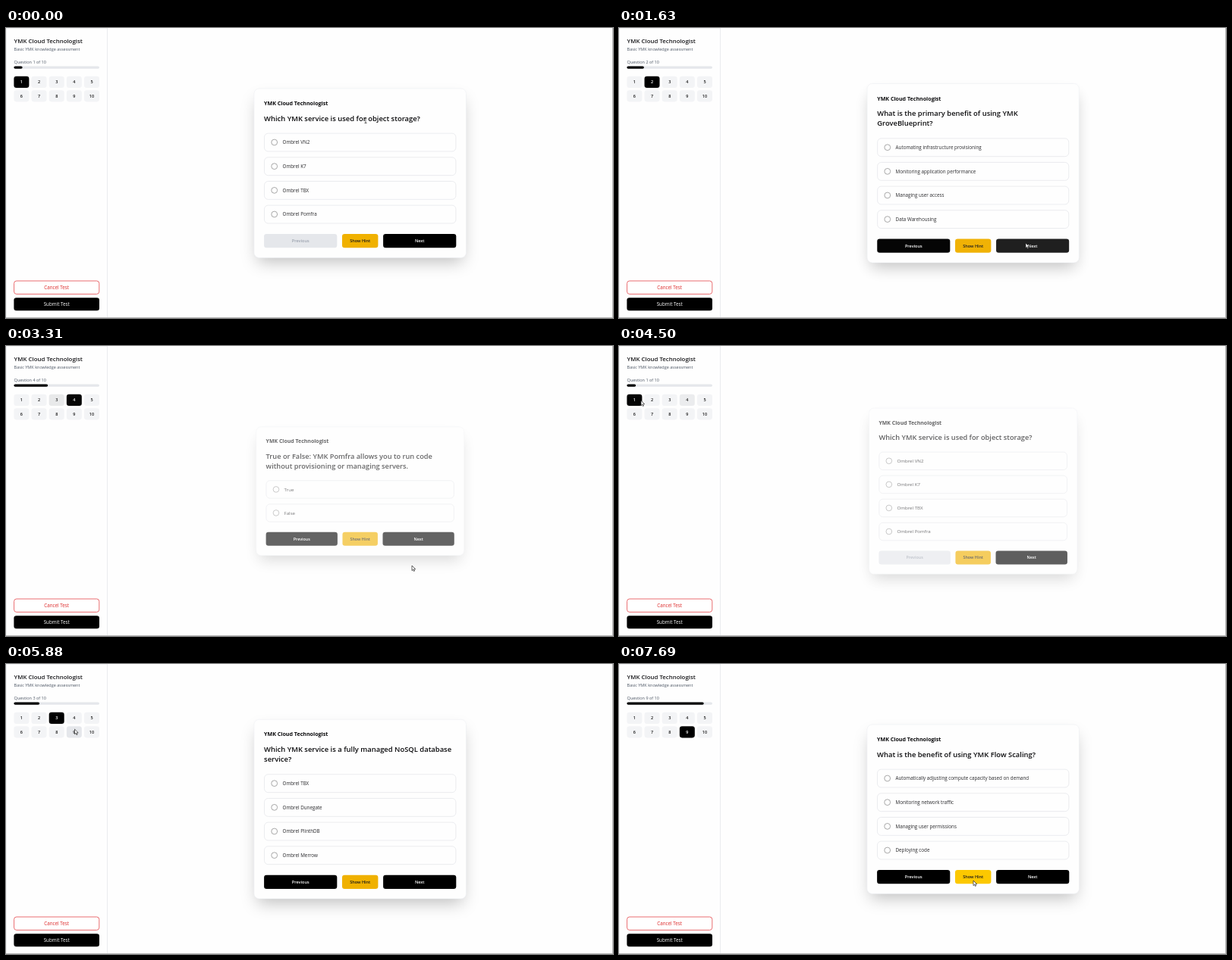
An HTML page with a canvas for the animation above (8 s loop, 800 by 383 pixels).

```html
<!DOCTYPE html>
<html lang="en">
<head>
<meta charset="utf-8">
<title>Practice test</title>
<style>
  html, body { margin: 0; width: 100%; height: 100%; overflow: hidden; background: #fefefe; }
  canvas { display: block; width: 800px; height: 383px; }
</style>
</head>
<body>
<canvas id="stage"></canvas>
<script>
const W = 800, H = 383, LOOP = 8000;
const FONT = '"Open Sans", "Noto Sans", sans-serif';
const NAME = 'YMK Cloud Technologist';
const CENTER = { x: 466.7, y: 191.7 };

const questions = {
  1: { title: ['Which YMK service is used for object storage?'],
       options: ['Ombrel VN2', 'Ombrel K7', 'Ombrel TBX', 'Ombrel Pomfra'] },
  2: { title: ['What is the primary benefit of using YMK', 'GroveBlueprint?'],
       options: ['Automating infrastructure provisioning', 'Monitoring application performance',
                 'Managing user access', 'Data Warehousing'] },
  3: { title: ['Which YMK service is a fully managed NoSQL database', 'service?'],
       options: ['Ombrel TBX', 'Ombrel Dunegate', 'Ombrel PlinthDB', 'Ombrel Merrow'] },
  4: { title: ['True or False: YMK Pomfra allows you to run code', 'without provisioning or managing servers.'],
       options: ['True', 'False'] },
  9: { title: ['What is the benefit of using YMK Flow Scaling?'],
       options: ['Automatically adjusting compute capacity based on demand', 'Monitoring network traffic',
                 'Managing user permissions', 'Deploying code'] },
  10: { title: ['Which of the following is a valid method for accessing', 'YMK services?'],
        options: ['YMK Operations Console', 'Command Line Interface (CLI)',
                  'Software Development Kits (SDKs)', 'All of the above'] }
};

// [time, question]
const clicks = [[-1000, 1], [1240, 2], [2400, 3], [3070, 4], [4250, 1], [4850, 2], [5178, 3], [6070, 10], [6640, 9]];

// [time, x, y]
const path = [
  [0, 474, 122], [80, 474, 122], [860, 536, 255], [1060, 536, 284], [2060, 536, 284], [2190, 535, 290],
  [3400, 535, 290], [4150, 25, 72], [4300, 25, 72], [4480, 29, 72], [4560, 29, 72], [4800, 44, 73],
  [4920, 44, 73], [5130, 63, 74], [5690, 63, 74], [6000, 104, 92], [6460, 104, 92], [6600, 92, 90],
  [6750, 92, 90], [7250, 440, 226], [7690, 467, 286]
];

const dpr = window.devicePixelRatio || 1;
const stage = document.getElementById('stage');
const layer = document.createElement('canvas');
for (const c of [stage, layer]) { c.width = W * dpr; c.height = H * dpr; }
const main = stage.getContext('2d');
const card = layer.getContext('2d');

const clamp = v => Math.max(0, Math.min(1, v));
const mix = (a, b, k) => a + (b - a) * k;
const smooth = k => k * k * (3 - 2 * k);

// cubic-bezier(.4, 0, .2, 1)
function standardEase(x) {
  let lo = 0, hi = 1, u = x;
  for (let i = 0; i < 20; i++) {
    u = (lo + hi) / 2;
    const bx = 1.2 * u * (1 - u) ** 2 + 0.6 * u * u * (1 - u) + u ** 3;
    if (bx < x) lo = u; else hi = u;
  }
  return u * u * (3 - 2 * u);
}

function cursorAt(t) {
  const i = path.findIndex(p => p[0] > t);
  if (i < 0) return { x: path.at(-1)[1], y: path.at(-1)[2] };
  const [t0, x0, y0] = path[i - 1], [t1, x1, y1] = path[i];
  const k = smooth((t - t0) / (t1 - t0));
  return { x: mix(x0, x1, k), y: mix(y0, y1, k) };
}

function stateAt(t) {
  let i = clicks.length - 1;
  while (clicks[i][0] > t) i--;
  const age = t - clicks[i][0];
  return {
    current: clicks[i][1],
    previous: clicks[Math.max(0, i - 1)][1],
    ease: standardEase(clamp(age / 300)),
    fade: clamp(age / 400),
    cursor: cursorAt(t)
  };
}

const inside = (p, x, y, w, h) => p.x >= x && p.x <= x + w && p.y >= y && p.y <= y + h;

function box(g, x, y, w, h, r, fill, stroke, line = 0.7) {
  g.beginPath();
  g.roundRect(x, y, w, h, r);
  if (fill) { g.fillStyle = fill; g.fill(); }
  if (stroke) { g.strokeStyle = stroke; g.lineWidth = line; g.stroke(); }
}

// y is the middle of the capital letters
function text(g, str, x, y, size, color, weight = 400, align = 'left') {
  g.font = `${weight} ${size}px ${FONT}`;
  g.textAlign = align;
  g.fillStyle = color;
  g.fillText(str, x, y + size * 0.36);
}

function button(g, label, x, y, w, h, fill, color, size = 5.5, weight = 600, stroke) {
  box(g, x, y, w, h, 3.3, fill, stroke, 0.8);
  text(g, label, x + w / 2, y + h / 2, size, color, weight, 'center');
}

function drawSidebar(g, s) {
  g.fillStyle = '#e5e7eb';
  g.fillRect(133, 0, 0.8, H);
  g.fillRect(0, 0, 0.5, H);
  g.fillRect(0, 0, 133, 0.5);
  text(g, NAME, 10.6, 16.7, 7.85, '#18181b', 600);
  text(g, 'Basic YMK knowledge assessment', 10.6, 28.2, 5.5, '#4b5563');
  text(g, `Question ${s.current} of 10`, 10.6, 44.7, 5.5, '#4b5563');

  const done = mix(s.previous, s.current, s.ease) / 10;
  box(g, 10.4, 50.4, 112.6, 3.4, 1.7, '#e5e7eb');
  box(g, 10.4, 50.4, 112.6 * done, 3.4, 1.7, '#000');

  for (let n = 1; n <= 10; n++) {
    const x = 10.4 + (n - 1) % 5 * 23.15, y = n > 5 ? 82.2 : 63.8;
    const idle = inside(s.cursor, x, y, 20, 15.2) ? [229, 231, 235] : [243, 244, 246];
    let dark = 0;
    if (n === s.previous) dark = 1 - s.ease ** 2;
    if (n === s.current) dark = s.previous === n ? 1 : s.ease;
    const shade = idle.map(v => Math.round(v * (1 - dark)));
    const ink = Math.round(mix(24, 255, dark));
    button(g, n, x, y, 20, 15.2, `rgb(${shade})`, `rgb(${ink},${ink},${ink})`);
  }
  button(g, 'Cancel Test', 10.6, 334, 112.2, 17.4, '#fff', '#dc2626', 6.28, 400, '#e5484d');
  button(g, 'Submit Test', 10.4, 356.2, 112.6, 17, '#000', '#fff', 6.28, 400);
}

function drawCard(g, s) {
  const q = questions[s.current];
  const extra = (q.title.length - 1) * 13.3;
  const list = 58.9 + extra, foot = list + q.options.length * 31.67 + 6.6;
  const height = foot + 31.6, x = 326.7, top = CENTER.y - height / 2, left = x + 13.4;
  const scale = 0.95 + 0.05 * s.fade;
  const point = {
    x: CENTER.x + (s.cursor.x - CENTER.x) / scale,
    y: CENTER.y + (s.cursor.y - CENTER.y) / scale
  };

  g.setTransform(dpr, 0, 0, dpr, 0, 0);
  g.clearRect(0, 0, W, H);
  g.translate(CENTER.x, CENTER.y);
  g.scale(scale, scale);
  g.translate(-CENTER.x, -CENTER.y);

  g.save();
  g.shadowColor = 'rgba(0,0,0,.25)';
  g.shadowBlur = 20.8 * dpr * scale;
  g.shadowOffsetY = 10.4 * dpr * scale;
  box(g, x + 5, top + 5, 270, height - 10, 4, '#fff');
  g.restore();
  box(g, x + 0.2, top + 0.2, 279.6, height - 0.4, 6.7, '#fefefe', '#ebedf0', 0.5);

  text(g, NAME, left, top + 19.7, 7.1, '#09090b', 700);
  q.title.forEach((line, i) => text(g, line, left, top + 39.5 + i * 13.3, 9.42, '#09090b', 600));

  q.options.forEach((label, i) => {
    const y = top + list + i * 31.67;
    const hover = inside(point, left, y, 253, 24.6);
    box(g, left + 0.4, y + 0.4, 252.4, 23.9, 5, hover ? '#f9fafb' : '#fefefe', hover ? '#d1d5db' : '#e2e4e8');
    g.beginPath();
    g.arc(left + 13.6, y + 12.3, 3.9, 0, Math.PI * 2);
    g.fillStyle = '#fff';
    g.fill();
    g.strokeStyle = '#8b8b8b';
    g.lineWidth = 0.75;
    g.stroke();
    text(g, label, left + 24.4, y + 12.3, 6.28, '#27272a');
  });

  const action = (label, dx, w, base, hover, color, disabled) => {
    const y = top + foot;
    const fill = inside(point, left + dx, y, w, 18.3) ? hover : base;
    button(g, label, left + dx, y, w, 18.3, disabled ? '#e5e7eb' : fill, disabled ? '#9ca3af' : color);
  };
  action('Previous', 0, 96.2, '#000', '#1a1a1a', '#fff', s.current === 1);
  action('Show Hint', 102.9, 47.4, '#f0b100', '#fcc800', '#18181b');
  action('Next', 157, 96.2, '#000', '#1a1a1a', '#fff', s.current === 10);
}

function drawCursor(g, { x, y }, beam) {
  g.lineWidth = 0.7;
  g.strokeStyle = '#222';
  g.beginPath();
  if (beam) {
    g.moveTo(x - 1.5, y - 3); g.lineTo(x + 1.5, y - 3);
    g.moveTo(x, y - 3); g.lineTo(x, y + 3.5);
    g.moveTo(x - 1.5, y + 3.5); g.lineTo(x + 1.5, y + 3.5);
    g.stroke();
    return;
  }
  const outline = [[0, 0], [0, 6.6], [1.5, 5.2], [2.5, 7.5], [3.6, 7], [2.6, 4.8], [4.7, 4.7]];
  outline.forEach(([dx, dy]) => g.lineTo(x + dx, y + dy));
  g.closePath();
  g.fillStyle = '#fff';
  g.fill();
  g.stroke();
}

function render(t) {
  const s = stateAt(t);
  main.setTransform(dpr, 0, 0, dpr, 0, 0);
  main.fillStyle = '#fefefe';
  main.fillRect(0, 0, W, H);
  drawSidebar(main, s);

  drawCard(card, s);
  main.globalAlpha = s.fade;
  main.drawImage(layer, 0, 0, W, H);
  main.globalAlpha = 1;

  main.fillStyle = '#b8b8b8';
  main.fillRect(0, 382, W, 1);
  main.fillRect(799, 0, 1, H);
  drawCursor(main, s.cursor, t < 130);
}

const start = performance.now();
function tick() {
  render((performance.now() - start) % LOOP);
  requestAnimationFrame(tick);
}
tick();
</script>
</body>
</html>
```
